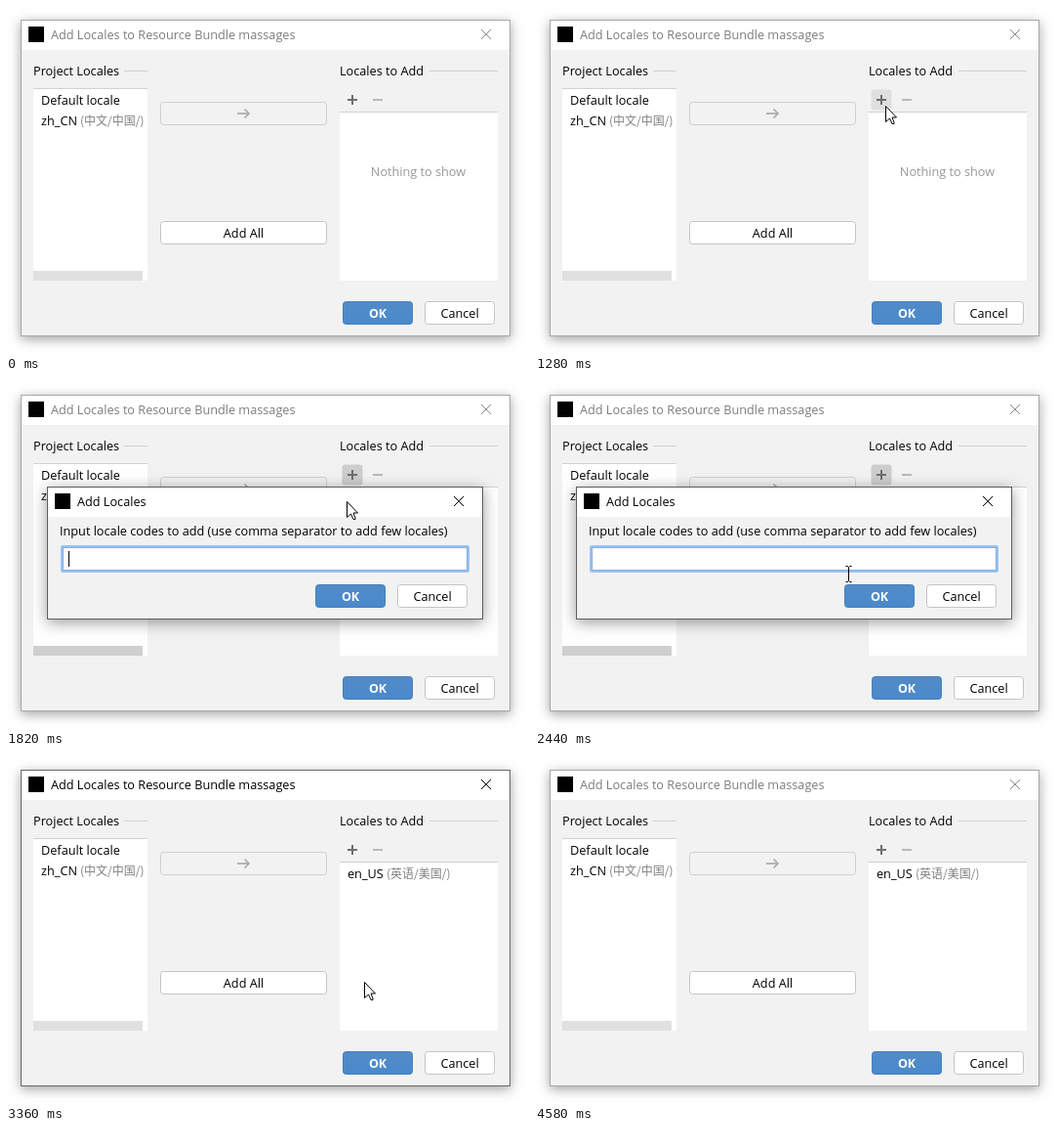
These frames come from a looping animation (536x355 px, 4.71 s). An HTML page with a canvas:

```html
<!DOCTYPE html>
<html lang="en">
<head>
<meta charset="utf-8">
<title>Add Locales</title>
<style>
html, body { margin: 0; width: 100%; height: 100%; overflow: hidden; background: #fff; }
canvas { display: block; }
</style>
</head>
<body>
<canvas id="stage" width="536" height="355"></canvas>
<script>
const W = 536, H = 355, LOOP = 4710;
const stage = document.getElementById('stage').getContext('2d');
const layer = document.createElement('canvas');
layer.width = W;
layer.height = H;
const popup = layer.getContext('2d');

const UI = '12.7px "Open Sans", "Noto Sans", sans-serif';
const BOLD = 'bold 12.5px "Open Sans", "Noto Sans", sans-serif';
const CJK = '12px "Noto Sans CJK SC", "Noto Sans CJK", sans-serif';

let g = stage;

function rect(x, y, w, h, color) {
  g.fillStyle = color;
  g.fillRect(x, y, w, h);
}

function text(str, x, y, color = '#000', font = UI, align = 'left') {
  g.font = font;
  g.fillStyle = color;
  g.textAlign = align;
  g.fillText(str, x, y);
}

function line(points, color, width = 1) {
  g.beginPath();
  points.forEach(([x, y], i) => i ? g.lineTo(x, y) : g.moveTo(x, y));
  g.strokeStyle = color;
  g.lineWidth = width;
  g.stroke();
}

function box(x, y, w, h, r, fill, stroke, width = 1) {
  g.beginPath();
  g.roundRect(x + .5, y + .5, w - 1, h - 1, r);
  if (fill) { g.fillStyle = fill; g.fill(); }
  if (stroke) { g.strokeStyle = stroke; g.lineWidth = width; g.stroke(); }
}

function button(label, x, y, w) {
  box(x, y, w, 24, 3, '#fff', '#c4c4c4');
  text(label, x + w / 2, y + 16.5, '#000', UI, 'center');
}

function primary(x, y, focused) {
  if (focused) box(x - 1, y - 1, 74, 26, 4, null, '#97c3f3', 3);
  const blue = g.createLinearGradient(0, y, 0, y + 24);
  blue.addColorStop(0, '#528cc7');
  blue.addColorStop(1, '#4989cc');
  box(x, y, 72, 24, 3, blue, '#487eb8');
  text('OK', x + 36, y + 16.5, '#fff', BOLD, 'center');
}

function frame(x, y, w, h, bar, border, blur, dark) {
  g.save();
  g.shadowColor = `rgba(0,0,0,${dark})`;
  g.shadowBlur = blur;
  g.shadowOffsetY = 3;
  rect(x, y, w, h, border);
  g.restore();
  rect(x + 1, y + 1, w - 2, h - 2, '#f2f2f2');
  rect(x + 1, y + 1, w - 2, bar, '#fff');
}

function closeMark(x, y, color) {
  line([[x - 5, y - 5], [x + 5, y + 5]], color);
  line([[x - 5, y + 5], [x + 5, y - 5]], color);
}

function locale(code, note, x, y) {
  text(code, x, y);
  text(note, x + 40, y, '#808080', CJK);
}

function mainDialog(t) {
  const active = (t >= 1480 && t < 1610) || (t >= 3220 && t < 4580);
  const fading = t >= 1610 && t < 1680;
  const opened = t >= 1480 && t < 3290;
  const tone = active ? '#000' : fading ? '#666' : '#7d7d7d';

  frame(15, 14, 502, 324, 30, active ? '#6a6a6a' : '#a8a8a8', 11, .36);
  rect(23, 21, 16, 16, '#000');
  text('Add Locales to Resource Bundle massages', 46, 34, tone);
  closeMark(492, 29, active ? '#000' : '#8c8c8c');

  text('Project Locales', 28, 71);
  rect(121, 66, 24, 1, '#d1d1d1');
  text('Locales to Add', 342, 71);
  rect(434, 66, 70, 1, '#d1d1d1');

  rect(28, 84, 117, 1, '#d1d1d1');
  rect(28, 85, 117, 196, '#fff');
  text('Default locale', 36, 101);
  locale('zh_CN', '(中文/中国/)', 36, 122);
  rect(28, 271, 112, 10, opened ? '#cfcfcf' : '#e0e0e0');

  box(158, 98, 171, 24, 3, '#f2f2f2', '#cfcfcf');
  line([[237, 110], [249, 110]], '#ababab', 1.7);
  line([[244.5, 105.5], [249, 110], [244.5, 114.5]], '#ababab', 1.7);
  button('Add All', 158, 220, 171);

  if (t >= 610 && t < 3290) box(344, 85, 22, 22, 3, opened ? '#cdcdcd' : '#dfdfdf');
  rect(350, 95, 10, 2, '#6e6e6e');
  rect(354, 91, 2, 10, '#6e6e6e');
  rect(376, 95, 10, 2, '#bababa');

  rect(342, 108, 162, 1, '#d1d1d1');
  rect(342, 109, 162, 172, '#fff');
  if (t >= 3290) locale('en_US', '(英语/美国/)', 350, 125);
  else text('Nothing to show', 422.5, 174, opened ? '#828282' : '#999', UI, 'center');

  primary(345, 302, false);
  button('Cancel', 429, 302, 72);
}

function inputDialog(t) {
  const confirm = t >= 3000;
  frame(42, 108, 447, 136, 30, '#5e5e5e', 14, .4);
  rect(50, 115, 16, 16, '#000');
  text('Add Locales', 73, 128);
  closeMark(464, 123, '#000');
  text('Input locale codes to add (use comma separator to add few locales)', 55, 158);

  if (confirm) box(57, 169, 416, 25, 0, '#fff', '#c4c4c4');
  else {
    box(57, 169, 417, 26, 1, '#fff', '#97c3f3', 3);
    box(58, 170, 415, 24, 0, null, '#87afda');
  }
  if (t >= 2510) text('en_US', 64, 186);
  if (t < 2100) rect(64, 174, 1, 16, '#000');
  else if (t >= 2510 && !confirm) rect(100, 174, 1, 16, '#000');

  primary(317, 208, confirm);
  button('Cancel', 401, 208, 72);
}

function popupPose(t) {
  if (t < 1610 || t >= 3360) return null;
  if (t < 1680) return [.14, .958];
  if (t < 1750) return [.55, .98];
  if (t < 1820) return [.86, .994];
  if (t < 3220) return [1, 1];
  return t < 3290 ? [.6, .975] : [.15, .94];
}

function drawPopup(t) {
  const pose = popupPose(t);
  if (!pose) return;
  const [alpha, scale] = pose;
  g = popup;
  g.clearRect(0, 0, W, H);
  inputDialog(t);
  g = stage;
  g.save();
  g.globalAlpha = alpha;
  g.translate(265.5, 175.5);
  g.scale(scale, scale);
  g.drawImage(layer, -265.5, -175.5);
  g.restore();
}

// start, end, intervals, from, to, easing power
const moves = [
  [130, 610, 7, [471, 333], [366, 103], 1.8],
  [680, 681, 1, [366, 102], [366, 102], 1],
  [1140, 1280, 2, [366, 102], [359, 102], 1],
  [1750, 1960, 3, [359, 102], [329, 166], 1],
  [1960, 2440, 7, [329, 166], [321, 197], 1.5],
  [2510, 2800, 4, [327, 200], [355, 227], 1.4],
  [3220, 3360, 2, [355, 227], [367, 231], 1],
  [3360, 3500, 2, [367, 231], [411, 268], 1],
  [3500, 3850, 5, [411, 268], [431, 362], 1.2]
];

function pointer(t) {
  const move = moves.filter(m => t >= m[0]).pop();
  if (!move || t >= 3850) return null;
  const [start, end, n, a, b, power] = move;
  const step = Math.min(n, Math.floor((t - start) / (end - start) * n + .03));
  const k = 1 - (1 - step / n) ** power;
  return [0, 1].map(i => Math.round(a[i] + (b[i] - a[i]) * k));
}

function drawPointer(t) {
  const at = pointer(t);
  if (!at) return;
  g.save();
  g.translate(at[0] + .5, at[1] + .5);
  if (t >= 1960 && t < 2510) {
    line([[-3, -8], [-1, -8], [0, -7], [1, -8], [3, -8]], '#000');
    line([[0, -7], [0, 7]], '#000');
    line([[-3, 8], [-1, 8], [0, 7], [1, 8], [3, 8]], '#000');
  } else {
    const arrow = new Path2D('M0 0V16L4 12.5L6.5 18H8.5V16.5L6.5 11.5H11Z');
    g.fillStyle = '#fff';
    g.fill(arrow);
    g.strokeStyle = '#000';
    g.lineWidth = 1;
    g.stroke(arrow);
  }
  g.restore();
}

const begin = performance.now();

function draw(now) {
  const t = Math.max(0, now - begin) % LOOP;
  g = stage;
  rect(0, 0, W, H, '#fff');
  mainDialog(t);
  drawPopup(t);
  drawPointer(t);
  requestAnimationFrame(draw);
}
draw(begin);
</script>
</body>
</html>
```
